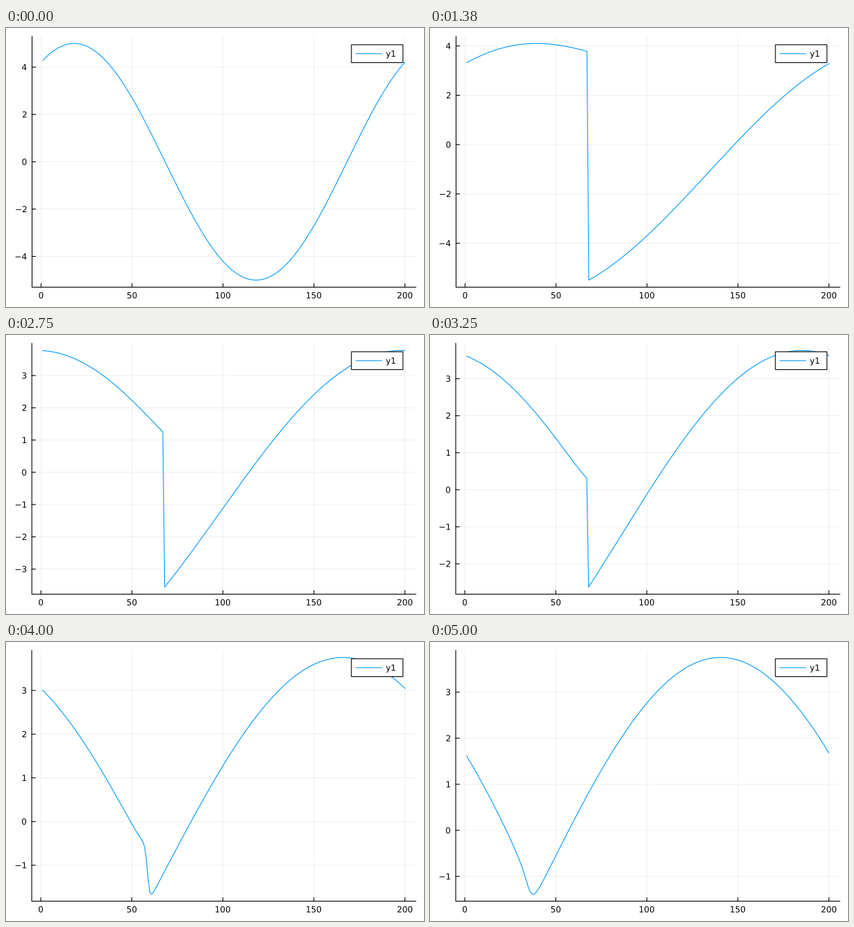
Animation, 600 px wide and 400 px high, one loop 5.12 s. Source, as a matplotlib script:

```python
import math
import numpy as np
import matplotlib.pyplot as plt
from matplotlib.animation import FuncAnimation
from matplotlib.patches import PathPatch, Rectangle
from matplotlib.textpath import TextPath
from matplotlib.transforms import Affine2D

W, H, DPI = 600, 400, 100
FRAMES, LOOP_MS = 41, 5120
TOP, RIGHT, BOTTOM = 12.0, 588.2, 371.6
EM = 12
BLUE = "#009afa"
PX = 72 / DPI

# Forced inviscid Burgers equation on a periodic grid
N, DX, AMP = 200, 0.04, 5.0
DT, SUBSTEPS = 0.001, 100
K = np.arange(1, N + 1)
PHASE = 1 + 2 * np.pi * K / N


def simulate():
    """Upwind scheme in advective form; one state per displayed frame."""
    u, t = AMP * np.sin(PHASE), 0.0
    states = [u]
    for _ in range(FRAMES - 1):
        for _ in range(SUBSTEPS):
            slope = np.where(u > 0, u - np.roll(u, 1), np.roll(u, -1) - u) / DX
            u = u + DT * (AMP * np.sin(PHASE + t) - u * slope)
            t += DT
        states.append(u)
    return states


def padded(lo, hi):
    pad = 0.03 * (hi - lo)
    return lo - pad, hi + pad


def nice_ticks(lo, hi):
    """Score candidate steps on count, coverage and roundness."""
    best, best_score = None, -1
    for step, nice in ((1, 1), (2, 0.7), (2.5, 0.5), (3, 0.2), (5, 0.9)):
        first, last = math.ceil(lo / step), math.floor(hi / step)
        count = last - first + 1
        if count < 4:
            continue
        grain = max(0, 1 - abs(count - 5) / 5)
        cover = 1.5 * (hi - lo) / ((count - 1) * step)
        score = grain / 4 + cover / 3 + nice / 4
        if score > best_score:
            best, best_score = (step, first, last), score
    step, first, last = best
    fmt = "{:.1f}" if step == 2.5 else "{:.0f}"
    values = [step * i for i in range(first, last + 1)]
    return [(v, fmt.format(v).replace("-", "\u2212")) for v in values]


def glyphs(s):
    path = TextPath((0, 0), s, size=EM, prop={"family": "DejaVu Sans"})
    return path, path.get_extents()


def label(s, x, y, align):
    """Place text by its ink box; y is the baseline."""
    path, box = glyphs(s)
    anchor = {"left": box.x0, "center": (box.x0 + box.x1) / 2, "right": box.x1}[align]
    place = Affine2D().translate(-anchor, 0).scale(1, -1).translate(x, y)
    ax.add_patch(PathPatch(place.transform_path(path), fc="black", lw=0))


def line(xs, ys, color="black", width=1.0, **kw):
    ax.plot(xs, ys, color=color, lw=width * PX, snap=False, **kw)


def legend(span):
    x1 = RIGHT - span / 30
    x0 = x1 - 14 - 0.109 * span
    ax.add_patch(Rectangle((x0, 24), x1 - x0, 25.6, fc="white", ec="black",
                           lw=1.1 * PX, snap=False, zorder=5))
    start = x0 + 0.012 * span
    end = start + span / 15
    line([start, end], [36.8, 36.8], BLUE, 1.1, zorder=6)
    label("y1", end + 0.0115 * span, 41.1, "left")
    ax.patches[-1].set_zorder(6)


def draw(i):
    ax.clear()
    ax.set(xlim=(0, W), ylim=(H, 0))
    ax.axis("off")

    u = states[i]
    xlo, xhi = padded(1, N)
    ylo, yhi = padded(u.min(), u.max())
    yticks = nice_ticks(ylo, yhi)
    left = 21.65 + max(glyphs(s)[1].width for _, s in yticks)
    span = RIGHT - left

    def px(x):
        return left + (x - xlo) / (xhi - xlo) * span

    def py(y):
        return BOTTOM - (y - ylo) / (yhi - ylo) * (BOTTOM - TOP)

    for v in range(0, 201, 50):
        x = px(v)
        line([x, x], [TOP, BOTTOM], width=0.6, alpha=0.1)
        line([x, x], [BOTTOM, BOTTOM - 5], width=1.1)
        label(str(v), x, 387.6, "center")
    for v, s in yticks:
        y = py(v)
        line([left, RIGHT], [y, y], width=0.6, alpha=0.1)
        line([left, left + 5], [y, y], width=1.1)
        label(s, left - 8, y + 4.4, "right")

    line([left, left, RIGHT], [TOP, BOTTOM, BOTTOM], width=1.1)
    line(px(K), py(u), BLUE, 1.1, zorder=3)
    legend(span)


states = simulate()
fig = plt.figure(figsize=(W / DPI, H / DPI), dpi=DPI, facecolor="white")
ax = fig.add_axes([0, 0, 1, 1])
anim = FuncAnimation(fig, draw, frames=FRAMES, init_func=lambda: draw(0),
                     interval=LOOP_MS / FRAMES, repeat=True, repeat_delay=0)
plt.show()
```
